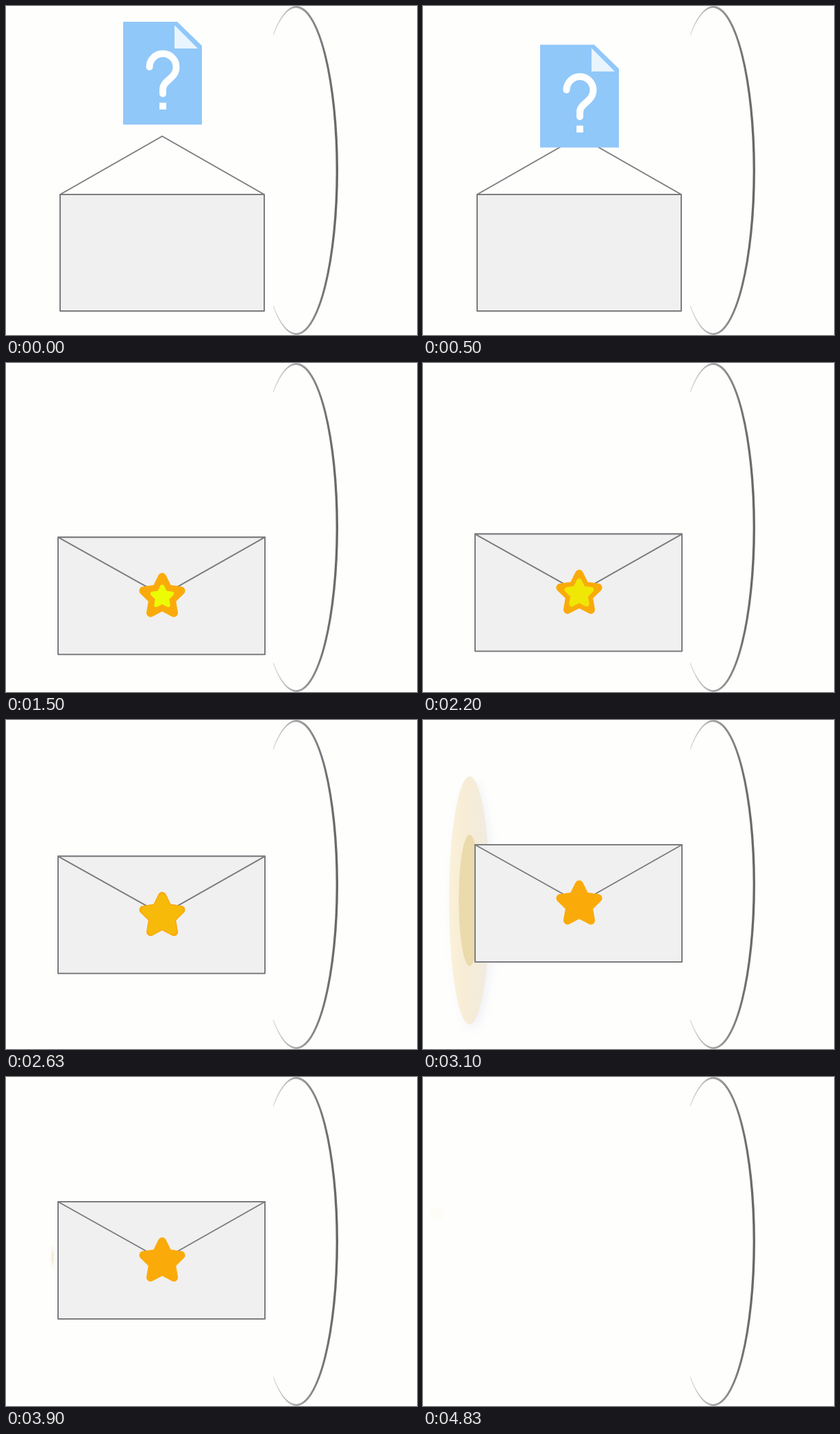
An HTML page with a canvas that plays this animation: 600 px wide and 480 px high, repeating every 6.03 s.

```html
<!DOCTYPE html>
<html lang="en">
<head>
<meta charset="utf-8">
<title>Sealed letter</title>
<style>
html, body { margin: 0; width: 100%; height: 100%; overflow: hidden; background: #fefefd; }
canvas { display: block; }
</style>
</head>
<body>
<canvas id="stage" width="600" height="480"></canvas>
<script>
const ctx = document.getElementById('stage').getContext('2d');
const LOOP = 6030, LAST = 4833, STEP = 100 / 3;
const PAPER = '#f0f0f0', LINE = '#7c7c7f', ORANGE = [250, 171, 10], YELLOW = [235, 252, 4];

const mix = (a, b, k) => a + (b - a) * k;
const phase = (t, from, to) => Math.min(1, Math.max(0, (t - from) / (to - from)));
const smooth = u => u * u * (3 - 2 * u);
const rgb = (a, b, k) => `rgb(${a.map((v, i) => Math.round(mix(v, b[i], k)))})`;

function poly(points, fill, stroke) {
  ctx.beginPath();
  points.forEach(([x, y]) => ctx.lineTo(x, y));
  ctx.closePath();
  if (fill) { ctx.fillStyle = fill; ctx.fill(); }
  if (stroke) { ctx.strokeStyle = stroke; ctx.stroke(); }
}

function oval(x, y, rx, ry, fill) {
  ctx.beginPath();
  ctx.ellipse(x, y, rx, ry, 0, 0, Math.PI * 2);
  ctx.fillStyle = fill;
  ctx.fill();
}

function star(x, y, size, color) {
  if (size <= 0) return;
  const points = [];
  for (let i = 0; i < 10; i++) {
    const a = -Math.PI / 2 + i * Math.PI / 5, r = i % 2 ? 14.5 : 29;
    points.push([r * Math.cos(a), r * Math.sin(a)]);
  }
  ctx.save();
  ctx.translate(x, y);
  ctx.scale(size, size);
  ctx.lineWidth = 12;
  poly(points, color, color);
  ctx.restore();
}

function drawSheet(t) {
  if (t >= 999) return;
  ctx.save();
  ctx.translate(0, 268 * Math.pow(t / 1000, 3));
  poly([[171, 23], [250, 23], [286, 58], [286, 173], [171, 173]], '#90c8f9');
  poly([[246, 28], [280, 62], [246, 62]], '#e9f5fe');
  ctx.strokeStyle = ctx.fillStyle = '#fff';
  ctx.lineWidth = 10;
  ctx.lineCap = 'round';
  ctx.beginPath();
  ctx.arc(229, 89, 19.5, Math.PI, Math.PI * 2.25);
  ctx.lineTo(233, 112);
  ctx.quadraticCurveTo(229, 116, 229, 122);
  ctx.lineTo(229, 128);
  ctx.stroke();
  ctx.fillRect(224, 141, 10, 10);
  ctx.restore();
}

function drawEnvelope(t) {
  const launch = phase(t, 3920, 4400);
  if (launch >= 1) return;
  const widen = phase(t, 1120, 1260);
  const rise = smooth(phase(t, 1835, 2935));
  const hop = 19 * Math.pow(Math.sin(Math.PI * phase(t, 1200, 1840)), 2);
  const left = mix(79, 76, widen), right = mix(377, 378, widen);
  const top = mix(275, 273, widen) - hop - 91 * rise;
  const height = mix(170, 171, widen);
  const fold = 1 - 2 * Math.pow(phase(t, 1120, 1460), 2);
  const flap = [[left, top], [228, top - 85 * fold], [right, top]];

  ctx.save();
  clipToRing();
  ctx.translate(412 * launch * launch, 0);
  ctx.lineWidth = 2;
  if (fold > 0) poly(flap, null, LINE);
  drawSheet(t);
  poly([[left, top], [right, top], [right, top + height], [left, top + height]], PAPER, LINE);
  if (fold <= 0) poly(flap, PAPER, LINE);
  const pop = smooth(phase(t, 1370, 1490));
  star(228, top + 87, pop, rgb(ORANGE, ORANGE, 0));
  if (rise < 1) star(228, top + 87, pop * mix(0.51, 1, rise), rgb(YELLOW, ORANGE, rise));
  ctx.restore();
}

// Everything beyond the ring's right rim is out of sight.
function clipToRing() {
  ctx.beginPath();
  ctx.moveTo(0, 0);
  ctx.lineTo(424, 0);
  ctx.ellipse(424, 240, 58, 240, 0, -Math.PI / 2, Math.PI / 2);
  ctx.lineTo(0, 480);
  ctx.clip();
}

function drawGlow(t) {
  const size = smooth(phase(t, 2680, 3180)) * (1 - phase(t, 3180, 3970));
  if (size <= 0) return;
  const rx = 32 * size, ry = 194 * size;
  const tint = ctx.createLinearGradient(68 - rx, 0, 68 + rx, 0);
  tint.addColorStop(0, '#fbf1d8');
  tint.addColorStop(0.5, '#f6ecd6');
  tint.addColorStop(1, '#f0ebe2');
  ctx.save();
  ctx.globalAlpha = Math.min(1, size * 4);
  ctx.shadowColor = 'rgba(110,110,170,0.09)';
  ctx.shadowBlur = 14;
  ctx.shadowOffsetX = 5 * size;
  ctx.shadowOffsetY = 7 * size;
  oval(68, 263, rx, ry, tint);
  ctx.shadowColor = 'transparent';
  oval(68, 263, rx * 0.53, ry * 0.53, '#ebdaab');
  ctx.restore();
}

function drawPuffs(t) {
  [[20, 309, 4730], [10, 255, 4790], [20, 200, 4900]].forEach(([x, y, end], i) => {
    const u = phase(t, 4020 + i * 40, end);
    if (u <= 0 || u >= 1) return;
    const go = smooth(Math.min(1, u * 1.08));
    ctx.globalAlpha = Math.min(1, u * 6) * (1 - u);
    oval(mix(56, x, go), mix(260, y, go), mix(5, 10, go), mix(5, 10, go), '#fbe7a6');
    ctx.globalAlpha = 1;
  });
}

function drawRing() {
  const shade = ctx.createLinearGradient(390, 0, 485, 0);
  [[0, '#dedede'], [0.16, '#bdbdbd'], [0.36, '#a6a6a8'], [0.6, '#88888a'], [0.8, '#737375'], [1, '#676768']]
    .forEach(([at, color]) => shade.addColorStop(at, color));
  const end = Math.PI / 2 + 0.595;
  ctx.beginPath();
  ctx.ellipse(424, 240, 61, 240, 0, -end, end);
  ctx.ellipse(423.2, 240, 58.4, 237.2, 0, end, -end, true);
  ctx.closePath();
  ctx.fillStyle = shade;
  ctx.fill();
}

function draw(now) {
  const elapsed = now % LOOP;
  const t = Math.min(LAST, Math.floor(elapsed / STEP + 0.11) * STEP);
  ctx.fillStyle = '#fefefd';
  ctx.fillRect(0, 0, 600, 480);
  ctx.lineJoin = 'round';
  drawGlow(t);
  drawPuffs(t);
  drawEnvelope(t);
  drawRing();
}

const start = performance.now();
function tick() {
  draw(performance.now() - start);
  requestAnimationFrame(tick);
}
tick();
</script>
</body>
</html>
```
